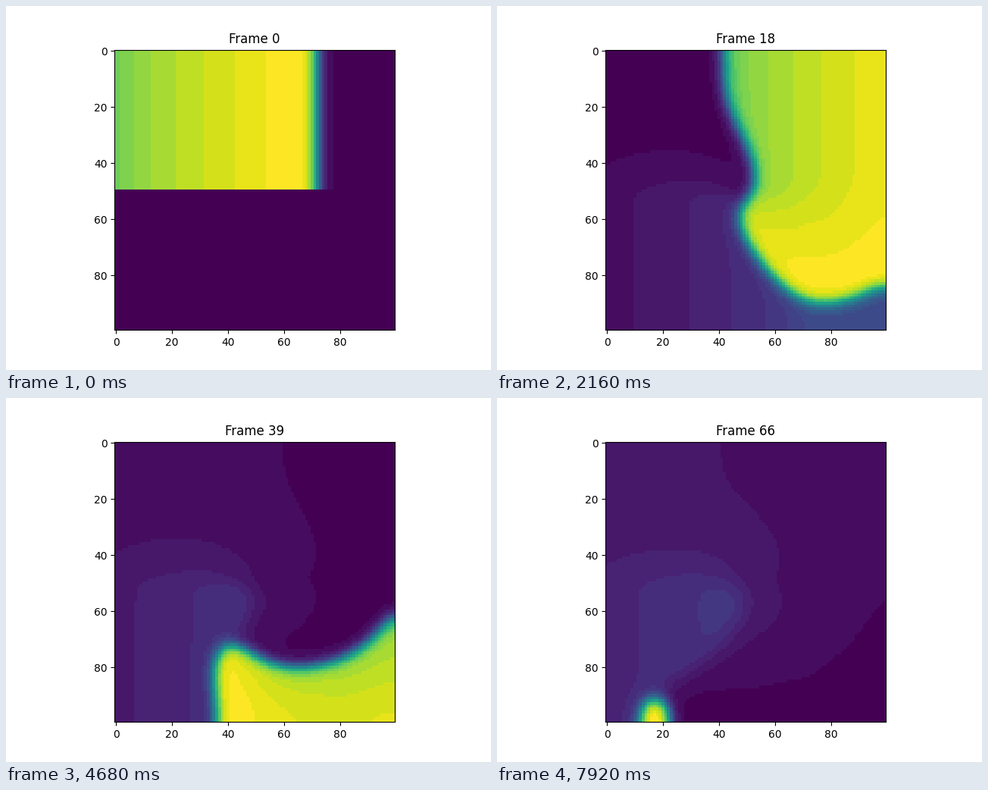
These frames come from a looping animation (640x480 px, 8000 ms). A matplotlib script:

```python
import numpy as np
import matplotlib.pyplot as plt
from matplotlib.animation import FuncAnimation
from matplotlib.colors import ListedColormap

# Excitable medium (FitzHugh-Nagumo) on a square grid with no-flux walls
SIZE = 100
THRESHOLD, DIFFUSION = 0.1, 1.0
RATE, DECAY = 0.00114, 0.5
DT, STEPS = 0.125, 40
SHOTS = 67
FRONT, WIDTH = 72.2, 1.45
SHADES = 32


def cubic(u):
    return u * (1 - u) * (u - THRESHOLD)


def laplacian(u):
    p = np.pad(u, 1, mode="edge")
    return p[:-2, 1:-1] + p[2:, 1:-1] + p[1:-1, :-2] + p[1:-1, 2:] - 4 * u


def first_state():
    """A plane wave moving right, its lower half wiped to rest."""
    x = np.tile(np.arange(SIZE) + 0.5, (SIZE, 1))
    behind = np.maximum(FRONT - x, 0)
    v = 0.002 * behind - 4.6e-6 * behind**2
    # Newton steps to the excited branch, where cubic(u) = v
    u = np.ones_like(v)
    for _ in range(12):
        slope = -3 * u**2 + 2 * (1 + THRESHOLD) * u - THRESHOLD
        u -= (cubic(u) - v) / slope
    u /= 1 + np.exp((x - FRONT) / WIDTH)
    u[SIZE // 2:] = 0
    return u, v


def simulate():
    u, v = first_state()
    shots = [u]
    for _ in range(SHOTS - 1):
        for _ in range(STEPS):
            du = DIFFUSION * laplacian(u) + cubic(u) - v
            dv = RATE * (u - DECAY * v)
            u, v = u + DT * du, v + DT * dv
        shots.append(u)
    return shots


def banded_viridis():
    top = SHADES - 1
    levels = np.round(np.linspace(0, top, 256)) / top
    return ListedColormap(plt.get_cmap("viridis")(levels))


shots = simulate()
fig, ax = plt.subplots(figsize=(6.4, 4.8), dpi=100)
image = ax.imshow(shots[0], cmap=banded_viridis(), interpolation="nearest")
title = ax.set_title("Frame 0")


def update(tick):
    n = tick // 3
    u = shots[n]
    image.set_data(u)
    image.set_clim(u.min(), u.max())
    title.set_text(f"Frame {n}")
    return image, title


# Each shot is held for three ticks, the last one for two
anim = FuncAnimation(fig, update, frames=200, interval=40, repeat=True,
                     repeat_delay=0, blit=False)
plt.show()
```
